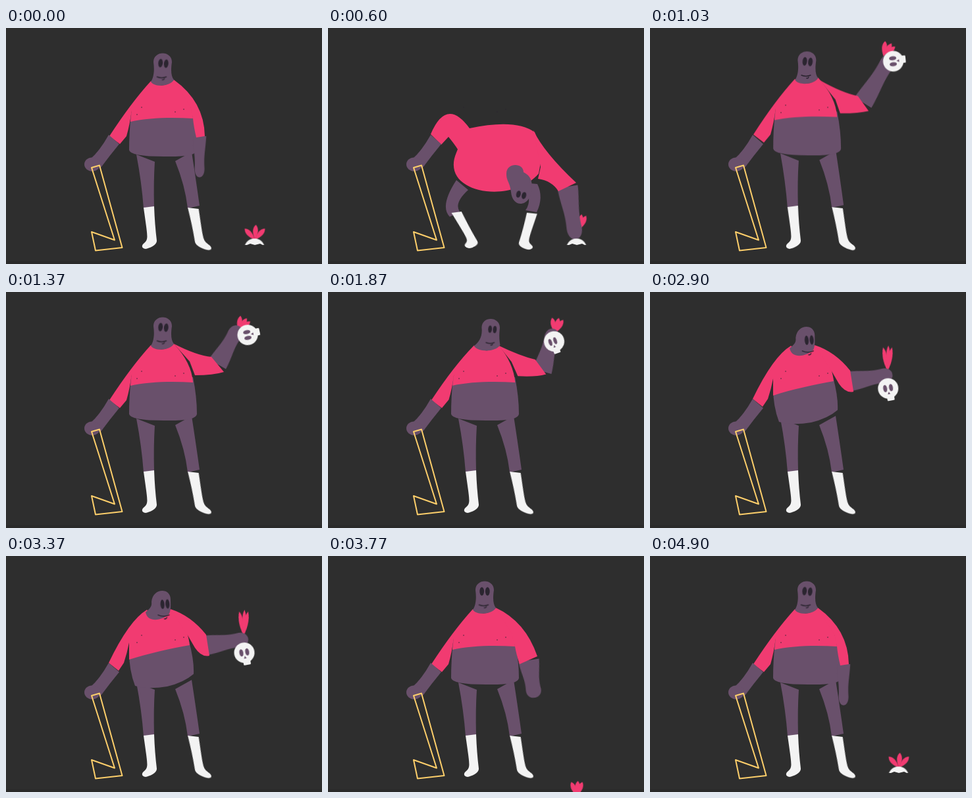
An HTML page without scripts for the animation above (5260 ms loop, 480 px wide and 360 px high).

```html
<!DOCTYPE html>
<html lang="en">
<head>
<meta charset="utf-8">
<title>Gravedigger</title>
<style>
html, body { margin: 0; width: 100%; height: 100%; overflow: hidden; background: #2e2e2e; }
svg { display: block; width: 100%; height: 100%; }
svg * { animation: 5.26s ease-in-out infinite; }
.pink { fill: #f13b71; }
.skin { fill: #69506b; }
.bone { fill: #f3f3f3; }
.ink { fill: none; stroke: #2b2530; stroke-width: 1.5; stroke-linecap: round; }
.ink * { vector-effect: non-scaling-stroke; }

#man { animation-name: stretch; transform-origin: 240px 337px; }
#legL { animation-name: legL; }
#legR { animation-name: legR; }
#sockL { animation-name: sockL; transform-origin: 0 330px; }
#sockR { animation-name: sockR; transform-origin: 0 333px; }
#belly { animation-name: belly; }
#shirt { animation-name: shirt; }
#sleeve { animation-name: sleeve; }
#forearm { animation-name: forearm; }
#head { animation-name: head; }
#eyes { animation-name: eyes; }
#eyes ellipse { animation-name: blink; }
#mouth { animation-name: mouth; }
#skull { animation-name: skull; }
#face { animation-name: profile; }
#jaw { animation-name: jaw; }
#leaves { animation-name: leaves; }
#leafL { --fan: -1; animation-name: fan; }
#leafR { --fan: 1; animation-name: fan; }

/* Poses: stand, bend, raise, study, dangle, toss, stand */
@keyframes stretch {
  0%, 3.2%, 9%, 16%, 23.4%, 100% { transform: none; }
  5.3% { transform: scaleY(1.024); }
  19% { transform: scaleY(1.015); }
}

@keyframes legL {
  0%, 3.2%, 20%, 100% { d: path("M198 193L226 204Q224 235 225 273L209 275Q206 235 198 193Z"); }
  11.4%, 13.3% { d: path("M195 232L213 247Q191 267 200 280L185 288Q169 272 195 232Z"); }
}
@keyframes legR {
  0%, 3.2%, 20%, 100% { d: path("M257 203L282 189Q288 228 294 271L276 275Q272 240 257 203Z"); }
  11.4%, 13.3% { d: path("M296 236L318 238Q328 258 317 281L300 278Q312 262 296 236Z"); }
}
@keyframes sockL {
  0%, 3.2%, 20%, 100% { transform: none; }
  11.4%, 13.3% { transform: skewX(24deg) scaleY(.86); }
}
@keyframes sockR {
  0%, 3.2%, 20%, 100% { transform: skewX(16deg); }
  11.4%, 13.3% { transform: skewX(-10deg) scaleY(.87); }
}

@keyframes belly {
  0%, 3.2%, 20%, 46.2%, 66.9%, 100% { d: path("M190 130Q187 160 187 186Q188 196 240 196Q290 197 290 186Q290 160 284 130Z"); }
  11.4%, 13.3% { d: path("M200 190Q190 215 215 230Q240 243 250 243Q290 240 310 220Q318 200 315 190Z"); }
  55.7%, 64.1% { d: path("M187 145Q187 175 196 198Q215 204 245 199Q270 193 285 180Q286 160 278 130Z"); }
}
@keyframes shirt {
  0%, 3.2%, 20%, 33.7%, 67.5%, 100% { d: path("M220 81Q190 114 157 165L173 177L183 165Q188 148 191 125L189 143C215 137 250 136 284 138Q282 108 255 79Q238 95 220 81Z"); }
  11.4%, 13.3% { d: path("M215 153Q180 105 156 162L172 178L183 166Q192 177 197 185L195 190C168 253 280 270 320 222Q328 190 314 159Q285 138 215 153Z"); }
  39.4%, 46.2% { d: path("M228 83Q194 110 157 165L173 177L185 162Q190 148 193 124L190 142C215 137 250 136 285 138Q282 112 276 91Q252 103 228 83Z"); }
  55.7%, 64.1% { d: path("M214 82Q187 98 156 163L171 175L179 163Q184 148 187 132L187 158C215 149 250 141 279 136Q276 105 250 81Q234 103 214 82Z"); }
}
@keyframes sleeve {
  0%, 3.2%, 76.6%, 100% { d: path("M255 79Q301 112 302 165L289 167Q285 150 284 138L280 120Z"); }
  11.4%, 13.3% { d: path("M312 156Q328 190 377 236L350 249Q340 233 319 230L323 212Z"); }
  20.9%, 33.7%, 66.9% { d: path("M255 79Q290 97 312 99L331 122Q315 127 287 127L279 106Z"); }
  39.4%, 46.2% { d: path("M274 91Q298 99 324 117L332 138Q316 140 293 133L278 108Z"); }
  55.7%, 64.1% { d: path("M250 81Q281 91 304 120L309 152Q297 155 287 140L276 121Z"); }
  71.7% { d: path("M255 79Q300 100 318 153L291 165Q286 150 284 138L279 118Z"); }
}
@keyframes forearm {
  0%, 3.2%, 76.6%, 100% { transform: translate(294px, 165px) scale(.68, 1.08); }
  11.4%, 13.3% { transform: translate(364px, 242px) rotate(-9deg) scale(1.05, 1.4); }
  20.9%, 23.4%, 66.9% { transform: translate(321px, 109px) rotate(-157deg) scale(1, 1.5); }
  26% { transform: translate(321px, 110px) rotate(-150deg) scale(1, 1.15); }
  32.9%, 33.7% { transform: translate(324px, 119px) rotate(-162deg) scale(1, 1.15); }
  39.4%, 46.2% { transform: translate(329px, 128px) rotate(-173deg) scale(.95, 1.2); }
  55.7%, 64.1% { transform: translate(305px, 136px) rotate(-99deg) scale(1, 1.1); }
  71.7% { transform: translate(305px, 159px) rotate(-9deg) scale(1.05, 1); }
}

@keyframes head {
  0%, 3.2%, 20%, 33.7%, 67.5%, 100% { d: path("M220 82C224 76 226 66 224 52C224 34 252 34 252 52C250 66 251 74 255 79C250 89 225 91 220 82Z"); }
  11.4%, 13.3% { d: path("M271 222C271 234 276 234 278 250C280 276 309 274 310 243C310 228 304 224 297 220C297 205 271 205 271 222Z"); }
  39.4%, 46.2% { d: path("M228 83C248 78 266 74 266 62C267 44 293 46 292 64C292 78 294 84 284 88C268 102 240 96 228 83Z"); }
  55.7%, 64.1% { d: path("M212 86C218 80 222 78 221 70C223 48 250 48 250 66C250 74 251 80 248 88C240 97 216 104 212 86Z"); }
}
@keyframes eyes {
  0%, 3.2%, 20%, 33.7%, 86%, 100% { transform: translate(239px, 54px) rotate(6deg); }
  11.4%, 13.3% { transform: translate(293.5px, 254.5px) rotate(14deg) scale(1, .85); }
  39.4%, 46.2% { transform: translate(287px, 67px) scale(.3, .45); }
  55.7%, 64.1% { transform: translate(241.5px, 73.5px) rotate(-4deg) scale(.9, 1.1); }
  67.5%, 81.2% { transform: translate(238px, 54px); }
}
@keyframes blink {
  0%, 57%, 58.4%, 73.6%, 76%, 91.3%, 93.1%, 100% { ry: 6.5px; }
  57.7%, 74.8%, 92.2% { ry: .8px; }
}
@keyframes mouth {
  0%, 3.2%, 20%, 33.7%, 67.5%, 100% { opacity: 1; transform: translate(236.5px, 74.5px); }
  11.4%, 13.3% { opacity: 0; transform: translate(295px, 262px) scale(.5); }
  39.4%, 46.2% { opacity: 1; transform: translate(280px, 86px) scale(.5, .4); }
  55.7%, 64.1% { opacity: 1; transform: translate(239.5px, 90px) scale(1.2, 1.3); }
}

@keyframes skull {
  0%, 13.3%, 90.7%, 100% { transform: translate(377.5px, 336.5px); }
  20.9%, 23.4% { transform: translate(369px, 37px) rotate(-102deg); }
  26% { transform: translate(367px, 65.5px) rotate(-102deg); }
  32.9%, 33.7% { transform: translate(349px, 74px) rotate(-25deg); }
  39.4%, 46.2% { transform: translate(324.5px, 80px); }
  55.7%, 64.1% { transform: translate(362px, 147.5px) rotate(-10deg); }
  66.9% { transform: translate(340px, 38px) rotate(-60deg); animation-timing-function: linear; }
  70.7% { transform: translate(-60px, -20px) rotate(-90deg); animation-timing-function: step-end; }
  71%, 81.2% { transform: translate(377.5px, 380px); }
  84.6% { transform: translate(377.5px, 331px); }
  87.5% { transform: translate(377.5px, 338px); }
}
@keyframes leaves {
  0%, 3.2%, 90.7%, 100% { transform: translate(378px, 323px); }
  11.4%, 13.3% { transform: translate(382px, 307px) rotate(4deg); }
  20.9%, 23.4% { transform: translate(353px, 31px) rotate(30deg); }
  26% { transform: translate(353px, 59px) rotate(30deg); }
  32.9%, 33.7% { transform: translate(347px, 62px) rotate(14deg); }
  39.4%, 46.2% { transform: translate(337px, 63px) scale(1, 1.1); }
  55.7%, 64.1% { transform: translate(361px, 121px) scale(.8, 1.7); }
  66.9% { transform: translate(327px, 31px) rotate(-60deg); animation-timing-function: linear; }
  70.7% { transform: translate(-73px, -20px) rotate(-90deg); animation-timing-function: step-end; }
  71%, 81.2% { transform: translate(378px, 366px); }
  84.6% { transform: translate(378px, 318px) scale(1, 1.15); }
  87.5% { transform: translate(378px, 324px) scale(1, .92); }
}
@keyframes fan {
  0%, 3.2%, 87.5%, 100% { transform: rotate(calc(var(--fan) * 42deg)); }
  11.4%, 84.6% { transform: rotate(calc(var(--fan) * 22deg)); }
}
@keyframes profile {
  0%, 33.7%, 55.7%, 100% { transform: none; }
  39.4%, 46.2% { transform: translate(-9px, 0) scaleX(.4); }
}
@keyframes jaw {
  0%, 33.7%, 55.7%, 100% { transform: none; }
  39.4%, 46.2% { transform: translate(-10px, -1.5px) scaleX(.75); }
}
</style>
</head>
<body>
<svg viewBox="0 0 480 360">
  <defs>
    <clipPath id="soil"><path d="M-99-99H480V331H390L386 329 378 331 371 329 366 331H-99Z"/></clipPath>
    <path id="leaf" d="M0 0C-4-8-6-17 0-23C6-17 4-8 0 0Z"/>
    <path id="sock" d="M209 274L225 272Q226 300 229 324C230 331 218 336 212 337C206 336 205 332 210 328C217 322 215 318 209 274Z"/>
  </defs>
  <rect width="480" height="360" fill="#2e2e2e"/>
  <rect y="356" width="480" height="4" fill="#2a2a2a"/>

  <g id="man">
    <path id="legL" class="skin"/>
    <path id="legR" class="skin"/>
    <g id="sockL" class="bone"><use href="#sock"/></g>
    <g id="sockR" class="bone"><use href="#sock" transform="translate(518 2) scale(-1 1)"/></g>
    <path id="belly" class="skin"/>
    <path id="shirt" class="pink"/>
    <path class="ink" d="M199 132h0M206 121h0M257 128h0M270 124h0"/>
    <g id="leaves" class="pink" clip-path="none">
      <g id="leafL"><use href="#leaf"/></g>
      <use href="#leaf" transform="rotate(4)"/>
      <g id="leafR"><use href="#leaf"/></g>
    </g>
    <path id="forearm" class="skin" d="M-15 0C-14 20-9 28-11 46C-11 62 11 62 11 46C9 28 13 20 15 0Z"/>
    <path id="sleeve" class="pink"/>
    <g clip-path="url(#soil)">
      <g id="skull">
        <circle class="bone" r="15.5"/>
        <rect id="jaw" class="bone" x="-4" y="9" width="11" height="10" rx="1.5"/>
        <g id="face" class="skin">
          <ellipse cx="-4.500" cy="-.5" rx="3" ry="5.500"/>
          <ellipse cx="4.500" cy="-.5" rx="3" ry="5.500"/>
          <path d="M0 5L2 9H-2Z"/>
        </g>
      </g>
    </g>
    <path id="head" class="skin"/>
    <g id="eyes" fill="#2b2530">
      <ellipse cx="-4.300" rx="3.400"/>
      <ellipse cx="4.300" rx="3.400"/>
    </g>
    <g class="ink"><path id="mouth" d="M-7 0Q0 3 7 0M1 4.500Q3 5 4 3"/></g>
  </g>

  <g class="skin">
    <path d="M156 163L172 177Q158 194 144 213L128 200Q142 188 156 163Z"/>
    <ellipse cx="131" cy="208" rx="12" ry="10.500"/>
  </g>
  <path fill="none" stroke="#fdcf6b" stroke-width="2" stroke-linejoin="round" d="M130 213L142 209.500 176.500 335 136 339.500 130 311 165 323.500Z"/>
</svg>
</body>
</html>
```
